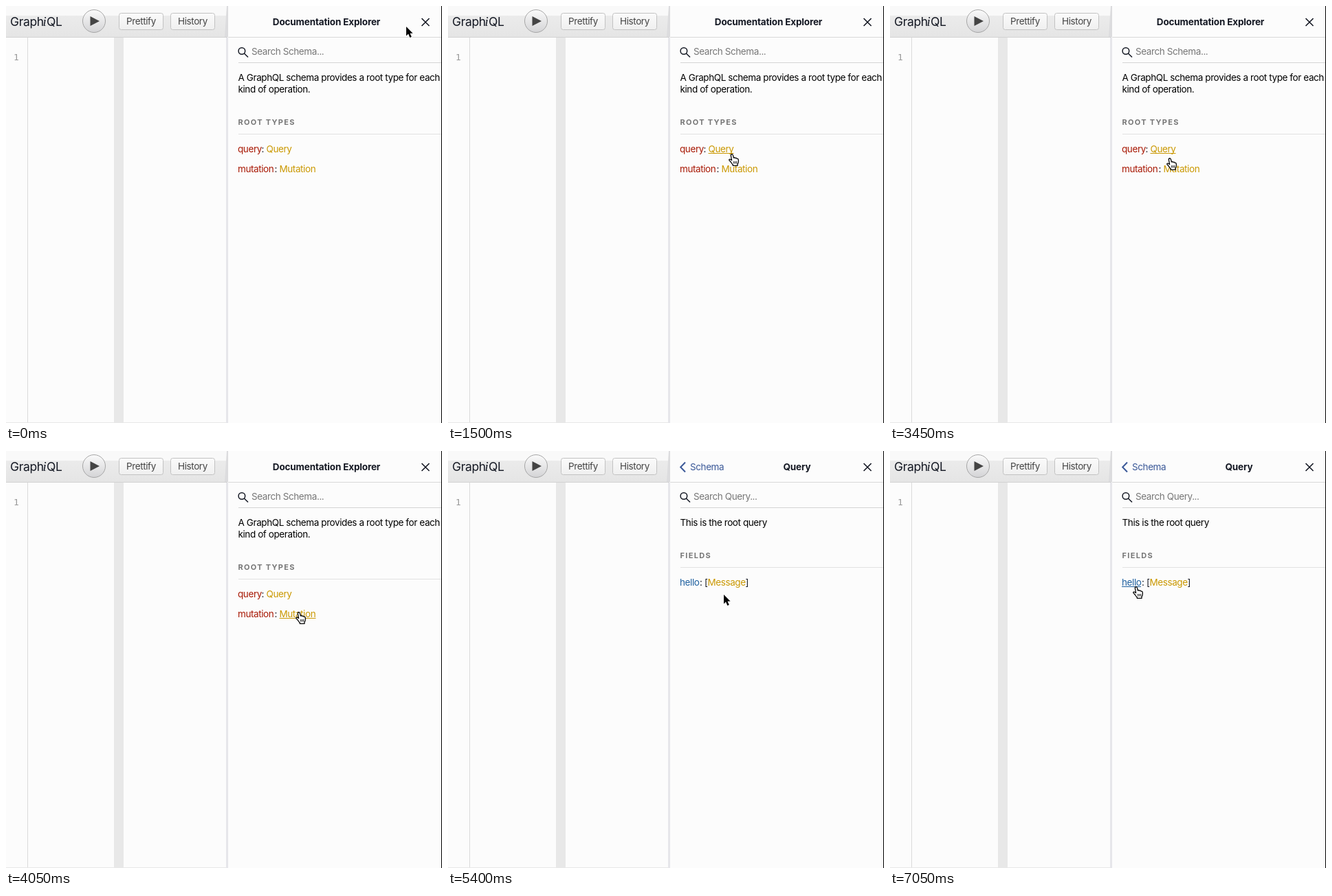
Animation of 634x607 px, one loop 8000 ms. Source, as an HTML page with a canvas:

```html
<!DOCTYPE html>
<html lang="en">
<head>
<meta charset="utf-8">
<title>Documentation Explorer</title>
<style>
  html, body { margin: 0; width: 100%; height: 100%; overflow: hidden; background: #fcfcfc; }
  canvas { display: block; width: 634px; height: 607px; }
</style>
</head>
<body>
<canvas id="stage" width="634" height="607"></canvas>
<script>
const ctx = document.getElementById('stage').getContext('2d');
const LOOP = 8000;
const PAGE_CHANGE = 5400;
const SANS = 'Inter, "Open Sans", sans-serif';
const BODY = { font: `13.5px ${SANS}`, spacing: -0.41 };
const TITLE = { font: `700 13.5px ${SANS}`, spacing: -0.15 };
const SECTION = { font: `700 11px ${SANS}`, spacing: 1.3 };
const LOGO = { font: `17.5px ${SANS}`, spacing: -0.35 };
const LOGO_I = { font: 'italic 19px "Liberation Serif", serif', spacing: 0 };
const MONO = { font: '13px "DejaVu Sans Mono", monospace', spacing: 0 };
const INK = '#141823', RED = '#a81804', GOLD = '#ca9800', BLUE = '#1f61a0', NAVY = '#3b5998', GREY = '#777';

// Pointer samples: time, x, y, hovered link. No link means an arrow; '' is a hand before the underline.
const POINTER = [
  [0, 582, 30], [150, 563, 42], [300, 527, 100], [450, 475, 119], [600, 426, 140],
  [750, 390, 157], [900, 371, 185], [1050, 385, 217, 'Query'], [1200, 395, 216, 'Query'],
  [1350, 403, 215, 'Query'], [1500, 408, 215, 'Query'],
  [2700, 399, 229, ''], [2850, 406, 238, 'Mutation'],
  [3300, 404, 229, ''], [3450, 402, 221, 'Query'], [3600, 400, 216, 'Query'],
  [4050, 421, 234, 'Mutation'], [4200, 424, 236, 'Mutation'], [4350, 421, 238, 'Mutation'],
  [4650, 414, 230, 'Mutation'], [4800, 406, 220, 'Query'], [4950, 400, 212, 'Query'], [5100, 396, 209, 'Query'],
  [5400, 401, 209], [5850, 366, 226], [6000, 333, 193, 'hello'],
  [6300, 334, 194, 'hello'], [6450, 346, 195, 'hello'], [6600, 375, 196, 'Message'],
  [6750, 392, 196, 'Message'], [6900, 374, 196, 'Message'], [7050, 353, 197, 'hello']
];

function rect(x, y, w, h, color) {
  ctx.fillStyle = color;
  ctx.fillRect(x, y, w, h);
}

function fade(y0, y1, from, to) {
  const g = ctx.createLinearGradient(0, y0, 0, y1);
  g.addColorStop(0, from);
  g.addColorStop(1, to);
  return g;
}

function text(str, x, y, color, style = BODY, align = 'left') {
  ctx.font = style.font;
  ctx.letterSpacing = style.spacing + 'px';
  ctx.textAlign = align;
  ctx.fillStyle = color;
  ctx.fillText(str, x, y);
}

function link(str, x, y, color, hovered) {
  text(str, x, y, color);
  if (str === hovered) rect(x, y + 1, Math.round(ctx.measureText(str).width), 1, color);
}

function stroke(d, color, width) {
  ctx.strokeStyle = color;
  ctx.lineWidth = width;
  ctx.stroke(new Path2D(d));
}

function button(label, x) {
  ctx.beginPath();
  ctx.roundRect(x + 0.5, 10.5, 64, 24, 3);
  ctx.fillStyle = fade(10, 35, '#fbfbfb', '#efefef');
  ctx.fill();
  ctx.strokeStyle = '#c2c2c2';
  ctx.lineWidth = 1;
  ctx.stroke();
  text(label, x + 32.5, 27, '#444', BODY, 'center');
}

function drawToolbar() {
  rect(0, 0, 322, 14, '#f9f9f9');
  rect(0, 14, 322, 31, fade(14, 45, '#ebebeb', '#e5e5e5'));
  rect(0, 45, 322, 1, '#d2d2d2');
  text('Graph', 6, 28.5, INK, LOGO);
  text('i', 53.5, 28.5, INK, LOGO_I);
  text('QL', 59, 28.5, INK, LOGO);

  ctx.beginPath();
  ctx.arc(128, 22, 16.5, 0, Math.PI * 2);
  ctx.fillStyle = fade(5, 39, '#fbfbfb', '#d3d3d5');
  ctx.fill();
  ctx.strokeStyle = '#a6a6a6';
  ctx.lineWidth = 1;
  ctx.stroke();
  ctx.fillStyle = '#444';
  ctx.fill(new Path2D('M122.5 15L136 22L122.5 29Z'));

  button('Prettify', 164);
  button('History', 239);
}

function drawEditor() {
  rect(31, 46, 1, 561, '#dadada');
  text('1', 11, 79, '#999', MONO);
  rect(157, 46, 14, 561, '#e8e8e8');
  rect(0, 606, 320, 1, '#e8e8e8');
}

function drawPanel() {
  ctx.fillStyle = '#dcdcde';
  ctx.fill(new Path2D('M321 0L318 45H323V0Z'));
  rect(320, 46, 3, 561, '#e6e6ea');
  rect(323, 0, 310, 607, '#fcfcfc');
  rect(323, 45, 310, 1, '#d8d8d8');
  rect(338, 82, 295, 1, '#d4d4d4');
  stroke('M604.5 18L615.5 29M615.5 18L604.5 29', INK, 1.6);
  stroke('M347.7 65.5A4.8 4.8 0 1 1 338.1 65.5A4.8 4.8 0 1 1 347.7 65.5M346.3 69L352 74.5', INK, 1.5);
}

function drawSection(title, baseline) {
  text(title, 337.5, baseline, GREY, SECTION);
  rect(338, baseline + 13, 295, 1, '#e2e2e2');
}

function drawSchema(hovered) {
  text('Documentation Explorer', 466, 28, INK, TITLE, 'center');
  text('Search Schema...', 357, 71, GREY);
  text('A GraphQL schema provides a root type for each', 337.5, 109, '#000');
  text('kind of operation.', 337.5, 126, '#000');
  drawSection('ROOT TYPES', 173);
  text('query', 337, 213, RED);
  text(':', 371.5, 213, INK);
  link('Query', 378.5, 213, GOLD, hovered);
  text('mutation', 337, 242, RED);
  text(':', 390.5, 242, INK);
  link('Mutation', 397.5, 242, GOLD, hovered);
}

function drawQuery(hovered) {
  stroke('M345 16.5L338.2 23.5L345 30.5', NAVY, 2);
  text('Schema', 352, 28, NAVY);
  text('Query', 507.5, 28, INK, TITLE, 'center');
  text('Search Query...', 357, 71, GREY);
  text('This is the root query', 337.5, 109, '#000');
  drawSection('FIELDS', 156);
  link('hello', 337, 196, BLUE, hovered);
  text(':', 366, 196, INK);
  text('[', 373, 196, INK);
  link('Message', 377.5, 196, GOLD, hovered);
  text(']', 432.5, 196, INK);
}

const ARROW = new Path2D('M0 0V13.4L3 10.6L5.3 16L7.8 15L5.5 9.7H9.6Z');
const HAND = new Path2D('M4.6 9.5L3.4 3Q3 .8 4.7 .7Q6 .7 6.5 2.6L7.4 6Q8.7 4.8 9.6 6.5' +
  'Q11 5.5 12 7.2Q14.2 6.8 14.3 9.2V11.5Q14.2 13.4 13 15V17.3H6.3V16Q4.6 14.4 3.4 12.3' +
  'L1.2 9.9Q.2 8.6 1.5 8.1Q2.7 7.8 4.6 9.5Z');

function drawPointer(x, y, isHand) {
  ctx.save();
  ctx.translate(x, y);
  ctx.lineJoin = 'round';
  ctx.fillStyle = isHand ? '#fff' : '#000';
  ctx.strokeStyle = isHand ? '#000' : '#fff';
  ctx.lineWidth = isHand ? 1.3 : 2;
  if (isHand) {
    ctx.fill(HAND);
    ctx.stroke(HAND);
    stroke('M7.6 11V14.5M9.6 11V14.5M11.6 11V14.5', '#000', 0.9);
  } else {
    ctx.stroke(ARROW);
    ctx.fill(ARROW);
  }
  ctx.restore();
}

function render(now) {
  const t = now % LOOP;
  const [, x, y, hovered] = POINTER.findLast(([time]) => time <= t);
  rect(0, 0, 634, 607, '#fcfcfc');
  drawToolbar();
  drawEditor();
  drawPanel();
  if (t < PAGE_CHANGE) drawSchema(hovered);
  else drawQuery(hovered);
  rect(633, 0, 1, 607, '#000');
  drawPointer(x, y, hovered !== undefined);
}

const start = performance.now();
function tick() {
  render(performance.now() - start);
  requestAnimationFrame(tick);
}
tick();
</script>
</body>
</html>
```
